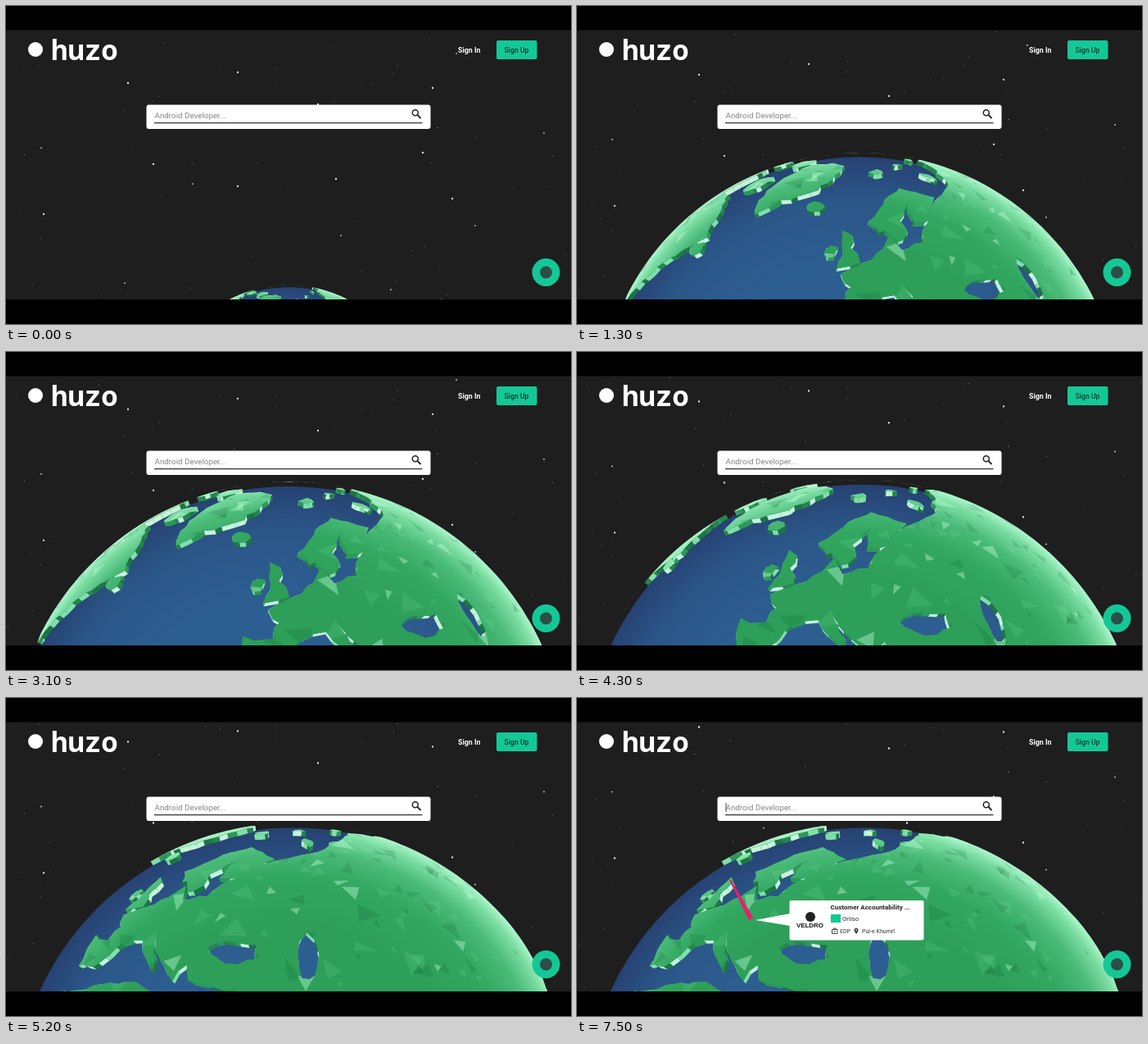
An HTML page with a canvas for the animation above (7.6 s loop, 690 by 388 pixels).

```html
<!DOCTYPE html>
<html lang="en">
<head>
<meta charset="utf-8">
<title>Job globe</title>
<style>
  html, body { margin: 0; width: 690px; height: 388px; overflow: hidden; background: #000; }
  canvas, svg { position: absolute; left: 0; top: 0; display: block; }
  text { font-family: Roboto, Inter, sans-serif; }
</style>
</head>
<body>
<canvas id="sky" width="690" height="388"></canvas>
<svg width="690" height="388" viewBox="0 0 690 388">
  <circle cx="36" cy="53" r="9" fill="#fff"/>
  <text x="55" y="66" fill="#fff" style="font:700 34px 'Noto Sans Mono',monospace">huzo</text>
  <text x="552" y="56.5" fill="#fff" font-size="8.8" font-weight="700">Sign In</text>
  <rect x="599" y="42" width="49.5" height="23" rx="2" fill="#14c896"/>
  <text x="608.5" y="56.5" fill="#0c3a30" font-size="8.7" font-weight="500">Sign Up</text>

  <rect x="171.5" y="120.5" width="347" height="29.5" rx="3" fill="#fff"/>
  <text x="181.5" y="136.5" fill="#858585" font-size="9.8">Android Developer...</text>
  <path d="M181 142.6H508.5" stroke="#333" stroke-width="1.4"/>
  <path id="caret" d="M182 128V139" stroke="#333" stroke-width=".9"/>
  <g fill="none" stroke="#222" stroke-width="1.5">
    <circle cx="499.8" cy="130.3" r="3.5"/>
    <path d="M502.4 132.9L506.5 137" stroke-width="1.9"/>
  </g>

  <path id="pin" fill="#e91e6f"/>
  <g id="card">
    <path d="M218 271L260 263V278Z" fill="#fff"/>
    <rect x="259.5" y="247" width="164" height="48.5" rx="2" fill="#fff"/>
    <circle cx="285" cy="267" r="6" fill="#222"/>
    <text x="268" y="279.5" fill="#111" style="font:700 7.9px 'Liberation Sans',sans-serif">VELDRO</text>
    <text x="309.5" y="258" fill="#222" font-size="7.95" font-weight="700">Customer Accountability ...</text>
    <rect x="310" y="264" width="12" height="10" fill="#14c896"/>
    <g fill="#333">
      <text x="324" y="272" font-size="7.8">Orliso</text>
      <text x="321" y="287" font-size="7">EDP</text>
      <text x="348" y="287" font-size="7.05">Pul-e Khumrī</text>
      <path d="M341 288L338.8 284.5A2.5 2.5 0 1 1 343.2 284.5Z"/>
      <circle cx="341" cy="283.2" r=".9" fill="#fff"/>
    </g>
    <path d="M311.5 282.5H318V287.5H311.5ZM313.5 282.5V281H316V282.5M313.5 285H316" fill="none" stroke="#333" stroke-width=".9"/>
  </g>

  <circle cx="659.5" cy="325" r="17" fill="#14c896"/>
  <circle cx="659.5" cy="325" r="7.5" fill="#2b4f47"/>
</svg>
<script>
const LOOP = 7600, RAD = Math.PI / 180, FOCAL = 1316, LAND = 1.016, CY = 498;
const ctx = document.getElementById('sky').getContext('2d');
const el = id => document.getElementById(id);
const clamp = v => Math.max(0, Math.min(1, v));
const mix = (a, b, k) => a + (b - a) * k;

let seed = 7;
const rnd = () => (seed = (seed * 16807) % 2147483647) / 2147483647;

// Rough coastlines as longitude, latitude pairs.
const eurasia = [26,71, 14,67, 5,61, 8,58, 10.5,59, 13,55.6, 17,57.5, 17,61, 23,65.8, 21.5,62.5, 22,60.2,
  28,60, 23.5,58.5, 21,55, 14,54, 10.5,57.5, 8.5,54, 2,51, -4.7,48.4, -1.5,46, -2,43.4, -9,43, -8,37,
  0,38, 4,43.3, 9,44.3, 17,39, 12.5,45, 22,37, 24,40.5, 27,37, 36,36.5, 36,28, 115,22, 121,30, 141,52,
  162,58, 190,66, 113,76, 104,77.5, 72,73, 60,69, 44,67, 35,64.5, 40,67];
const greenland = [-44,60, -53,67, -60,76, -68,79, -45,82.5, -18,82, -20,75, -24,70, -38,65.5];
const america = [-56,52, -64,46, -80,30, -120,35, -160,62, -125,70, -94,68, -82,54, -78,62, -66,59];
const britain = [-5,50, 1,51, -1,54.5, -2,57.5, -5,58.5, -3.5,54];

// Round islands and seas: centre, then half width and half height in degrees.
const blob = (lon, lat, w, h) => Array.from({ length: 9 }, (_, i) => {
  const r = mix(.8, 1.15, rnd()), a = i * 40 * RAD;
  return [lon + w * r * Math.cos(a), lat + h * r * Math.sin(a)];
}).flat();
const blackSea = blob(34.5, 43.6, 6.5, 2.1), caspian = blob(51, 43, 2.5, 4.3);
const islands = [
  [-19, 65, 5, 1.5], [-8, 53.4, 2.2, 1.7], [18, 78.5, 6, 1.3], [54, 80.7, 6, .5], [57, 73.5, 3.5, 2],
  [99, 79.6, 5, .9], [-56, 49, 3, 1.7], [-71, 68, 7, 3.3], [-80, 79, 12, 2.6], [-107, 73, 9, 2.6], [10, 29, 18, 7]
].map(spot => blob(...spot));
const coasts = [eurasia, blackSea, caspian, greenland, america, britain, ...islands].map(roughen);

// Split each edge into short, slightly jagged pieces.
function roughen(flat) {
  const out = [];
  for (let i = 0; i < flat.length; i += 2) {
    const [a, b] = [flat[i], flat[i + 1]];
    const c = flat[(i + 2) % flat.length], d = flat[(i + 3) % flat.length];
    const n = Math.ceil(Math.hypot((c - a) * Math.cos(b * RAD), d - b) / 2);
    for (let j = 0; j < n; j++) {
      const lat = mix(b, d, j / n) + (rnd() - .5) * .9;
      out.push([mix(a, c, j / n) + (rnd() - .5) * .9 / Math.cos(lat * RAD), lat]);
    }
  }
  return out;
}

const wallTints = ['#1d7545', '#26864e', '#2c9a58', '#7fe0a8', '#c4f6d9'];
const walls = coasts.map(ring => ring.map(() => wallTints[Math.floor(rnd() * 5)]));

// Low relief on the land surface.
const facets = Array.from({ length: 230 }, (_, i) => {
  const lon = mix(-110, 150, rnd()), lat = mix(36, 82, rnd()), size = mix(.8, 3.6, rnd());
  const turn = rnd() * 6.3;
  const points = [0, 2 + rnd(), 3.6].map((a, k) => {
    const r = k ? size : size * .4;
    return [lon + r * Math.cos(a + turn) / Math.cos(lat * RAD), lat + r * Math.sin(a + turn)];
  });
  const tint = i % 5 === 0 ? 'rgba(190,255,215,.4)' : i % 2 ? 'rgba(8,80,45,.16)' : 'rgba(130,235,170,.14)';
  return { points, tint };
});

const bright = [46,254, 545,235, 509,179, 521,100, 283,81, 149,94, 381,120, 180,193, 283,220, 403,211,
  409,280, 470,346, 657,155, 145,338, 228,217, 43,173, 573,268, 550,58];
const stars = [];
for (let i = 0; i < bright.length; i += 2) stars.push([bright[i], bright[i + 1], i < 20 ? 1.15 : .85, .95]);
for (let i = 0; i < 75; i++) stars.push([rnd() * 690, mix(30, 420, rnd()), .5, mix(.25, .7, rnd())]);

function drawStars(t) {
  ctx.fillStyle = '#fff';
  for (const [x, y, r, alpha] of stars) {
    ctx.globalAlpha = alpha;
    ctx.beginPath();
    ctx.arc(x, y - t * .0078, r, 0, 7);
    ctx.fill();
  }
  ctx.globalAlpha = 1;
}

function drawGlobe(t) {
  const p = clamp((t - 3590) / 1600);
  const fly = p < .5 ? 2 * p * p : 1 - 2 * (1 - p) ** 2;
  const dist = mix(4.065, 4, fly) + 4.485 * (1 - clamp(t / 2100)) ** 3;
  const lon0 = mix(1, 48, fly), lat0 = mix(23, 18, fly) * RAD, cx = mix(345, 350.5, fly);
  const R = FOCAL / Math.sqrt(dist * dist - 1);

  // Perspective view; points past the horizon slide onto the rim.
  const project = ([lon, lat], h) => {
    const a = (lon - lon0) * RAD, b = lat * RAD;
    const flat = Math.cos(b) * Math.cos(a);
    let x = Math.cos(b) * Math.sin(a);
    let y = Math.sin(b) * Math.cos(lat0) - flat * Math.sin(lat0);
    let z = Math.sin(b) * Math.sin(lat0) + flat * Math.cos(lat0);
    const rim = h / dist, seen = z >= rim;
    if (!seen) {
      const s = Math.sqrt(1 - rim * rim) / Math.hypot(x, y);
      x *= s; y *= s; z = rim;
    }
    const k = FOCAL * h / (dist - h * z);
    return { x: cx + x * k, y: CY - y * k, seen };
  };
  const trace = (path, pts) => {
    pts.forEach((q, i) => i ? path.lineTo(q.x, q.y) : path.moveTo(q.x, q.y));
    path.closePath();
  };
  const shade = (inner, stops) => {
    const g = ctx.createRadialGradient(cx - R * .05, CY + R * .03, R * inner, cx, CY, R * 1.02);
    stops.forEach(([at, tint]) => g.addColorStop(at, tint));
    return g;
  };

  ctx.fillStyle = shade(.6, [[0, '#2d5e92'], [.6, '#2b5688'], [1, '#263f70']]);
  ctx.beginPath();
  ctx.arc(cx, CY, R, 0, 7);
  ctx.fill();

  const land = new Path2D();
  coasts.forEach((ring, n) => {
    const top = ring.map(q => project(q, LAND));
    if (!top.some(q => q.seen)) return;
    const foot = ring.map(q => project(q, 1));
    top.forEach((q, i) => {
      const j = (i + 1) % top.length;
      if (!q.seen || !top[j].seen) return;
      const side = new Path2D();
      trace(side, [q, top[j], foot[j], foot[i]]);
      ctx.fillStyle = walls[n][i];
      ctx.fill(side);
    });
    trace(land, top);
  });

  ctx.fillStyle = shade(.7, [[0, '#2d9f58'], [.45, '#32a760'], [.72, '#4abb78'], [.9, '#7cdda3'], [1, '#b4f8d0']]);
  ctx.fill(land, 'evenodd');

  ctx.save();
  ctx.clip(land, 'evenodd');
  for (const { points, tint } of facets) {
    const tri = points.map(q => project(q, LAND));
    if (!tri.every(q => q.seen)) continue;
    const path = new Path2D();
    trace(path, tri);
    ctx.fillStyle = tint;
    ctx.fill(path);
  }
  ctx.restore();
}

function drawPin(t) {
  const grow = 1 - (1 - clamp((t - 5650) / 1000)) ** 2;
  const x = 212 - 25 * grow, y = 267 - 45 * grow;
  el('pin').setAttribute('d', `M${x - 1} ${y + .5}L${x + 1} ${y - .5}L215.5 268.5L210 271Z`);
  el('pin').style.display = t > 5650 ? '' : 'none';
  el('card').style.display = t >= 5700 ? '' : 'none';
}

function render(t) {
  ctx.fillStyle = '#000';
  ctx.fillRect(0, 0, 690, 388);
  ctx.save();
  ctx.beginPath();
  ctx.rect(0, 29.5, 690, 328.5);
  ctx.clip();
  ctx.fillStyle = '#1e1e1e';
  ctx.fillRect(0, 29, 690, 330);
  drawStars(t);
  drawGlobe(t);
  ctx.restore();
  drawPin(t);
  el('caret').style.display = t >= 7300 ? '' : 'none';
}

const start = performance.now();
function tick() {
  const t = (performance.now() - start) % LOOP;
  render(Math.floor(t / 100) * 100);
  requestAnimationFrame(tick);
}
tick();
</script>
</body>
</html>
```
